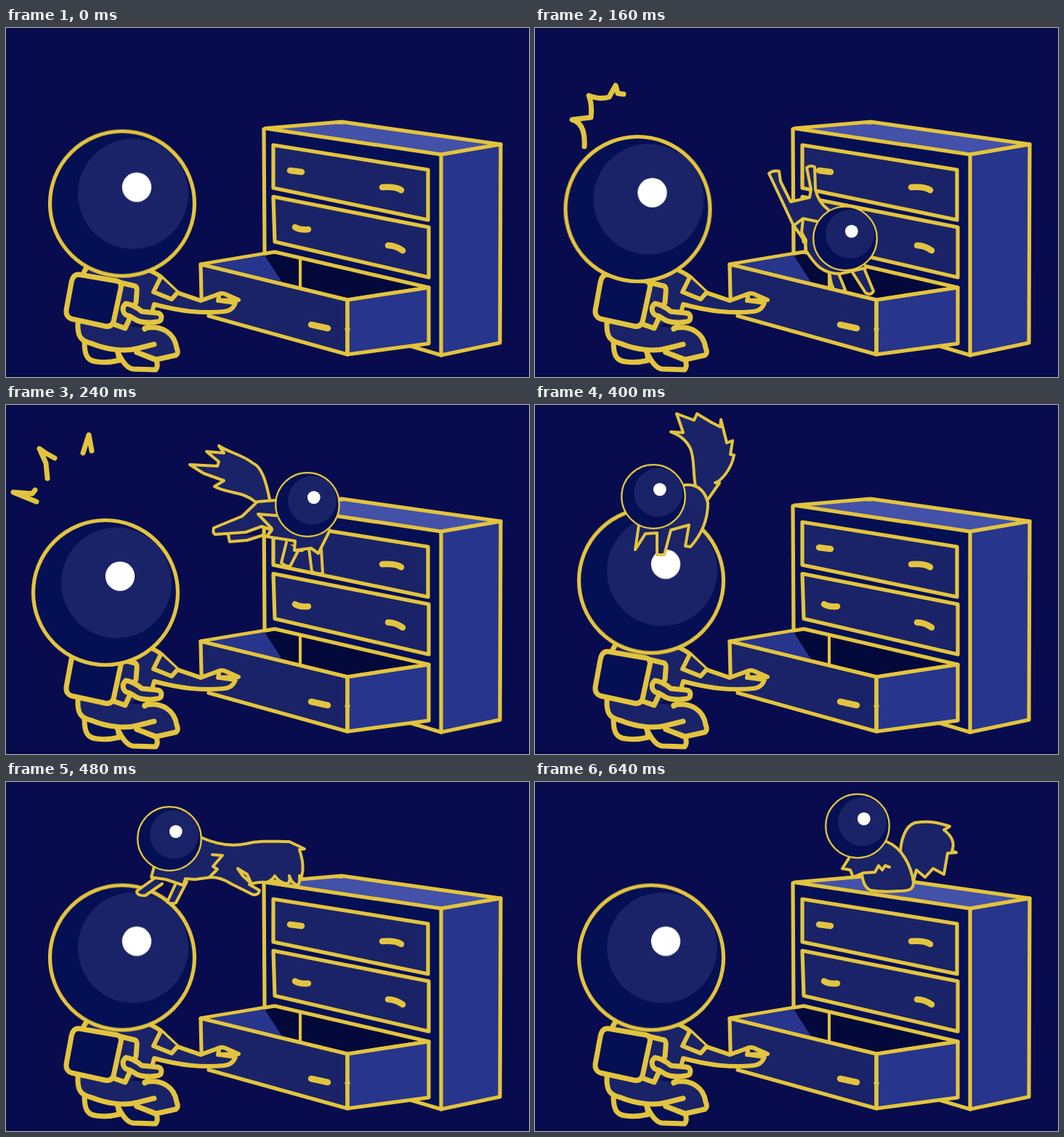
Write an HTML page that moves like this. It is 720 by 480 pixels and loops after 720 ms.

```html
<!DOCTYPE html>
<html lang="en">
<head>
<meta charset="utf-8">
<title>Drawer surprise</title>
<style>
html, body { margin: 0; width: 100%; height: 100%; overflow: hidden; background: #080c4e; }
svg { display: block; width: 100vw; height: 100vh; }
.ink { stroke: #e3c43f; stroke-width: 5.2; stroke-linecap: round; stroke-linejoin: round; fill: none; }
.pet { stroke-width: 4; }
.pull { stroke-width: 8.5; }
.thick { stroke-width: 7; }
.flat { stroke: none; }
.mid { fill: #1a2367; }
.deep { fill: #051054; }
.side { fill: #27358c; }
.top { fill: #4351a8; }
.hole { fill: #02083a; }
.cel { animation: cel 720ms step-end infinite; animation-delay: calc(var(--i) * 80ms - 720ms); }
@keyframes cel {
  0% { visibility: visible; }
  11.1111%, 100% { visibility: hidden; }
}
.helmet { animation: recoil 720ms step-end infinite; }
@keyframes recoil {
  0% { transform: translate(160px, 241.5px); }
  11.1111% { transform: translate(151px, 245px); }
  22.2222% { transform: translate(141.5px, 249px); }
  33.3333% { transform: translate(137px, 258px); }
  44.4444% { transform: translate(148px, 250px); }
  55.5555%, 100% { transform: translate(160px, 241.5px); }
}
</style>
</head>
<body>
<svg viewBox="0 0 720 480">
  <defs>
    <g id="globe">
      <circle class="ink deep" r="99.5"/>
      <circle class="flat mid" cx="15" cy="-13.5" r="76"/>
      <circle class="flat" cx="20" cy="-22.5" r="20.2" fill="#fff"/>
    </g>
    <g id="small"><use href="#globe" transform="scale(.44)"/></g>

    <g id="burst" class="ink pet mid">
      <path d="M406 340Q407 352 412 361Q420 365 427 360L418 338M437 336L455 364Q462 369 466 362L452 328"/>
      <path d="M404 250Q390 240 386 222L385 191Q379 188 374 192L380 222L378 233L352 239L338 211L336 197Q328 195 322 200L341 240L355 270L367 287Q374 298 373 306C385 325 395 338 420 338L455 330"/>
      <path d="M357 271L369 262L388 266M369 263L367 281L373 292L372 304" fill="none"/>
      <use href="#small" x="427" y="289.5"/>
    </g>

    <g id="leap" class="ink pet mid">
      <path d="M275 98L250 116Q250 123 262 122L285 106M303 107L292 131Q298 135 304 132L319 103"/>
      <path d="M338 42C360 52 380 55 400 51C420 46 440 48 460 48L481 58L474 59C479 75 480 85 477 96L474 95Q475 104 472 108Q463 106 460 95Q462 103 457 106Q446 104 440 95Q436 102 428 104Q418 103 405 107L419 115Q418 122 410 121L380 106Q366 97 352 97L330 100L317 99L314 108L290 100L270 97L274 82"/>
      <path d="M354 66L368 67L355 82L361 86L350 97M389 85L402 93L408 106L396 95Z" fill="none"/>
      <use href="#small" x="295" y="44"/>
    </g>
  </defs>

  <rect width="720" height="480" fill="#080c4e"/>
  <path d="M0 .5H720M0 478.5H720" stroke="#050838"/>

  <!-- chest -->
  <g class="ink">
    <path class="flat deep" d="M356 139L599 174V450L356 380Z"/>
    <path class="top" d="M357 138L462 129L681 160L599 174Z"/>
    <path class="side" d="M599 174L681 160L680 433L599 450Z"/>
    <path d="M355 139L356 309M552 436L599 450M457 130H463"/>
    <path class="mid" d="M368 161L581 195V264L368 220ZM368 232L582 274V343L370 294Z"/>
    <path class="pull" d="M391 196L407 198M518 219Q537 218 544 223M398 274Q404 278 416 277M526 299Q536 299 546 306"/>
    <path class="hole" d="M268 325L370 308L582 357L470 374Z"/>
    <path class="flat side" d="M271 325L355 311L381 351Z"/>
    <path d="M268 325L370 308L582 357M405 318V357" stroke-width="4"/>
  </g>

  <g class="cel" style="--i:1"><use href="#burst" x="-6" y="50"/></g>
  <g class="cel" style="--i:2"><use href="#burst"/></g>

  <!-- open drawer -->
  <g class="ink">
    <path class="flat mid" d="M268 325L470 374V449L270 393Z"/>
    <path class="side" d="M470 374L582 357V434L470 449Z"/>
    <path d="M269 370L268 325L470 374V449L279 396M469 414H471"/>
    <path class="pull" d="M420 408L443 413"/>
  </g>

  <!-- crouching figure -->
  <g class="ink thick">
    <path class="deep" d="M108 432C108 450 112 458 125 459Q140 461 156 457L153 440"/>
    <path class="deep" d="M153 444C158 455 165 468 175 469L206 470Q210 465 207 457L180 446"/>
    <path class="flat mid" d="M99 404L190 412C215 408 232 420 235 440Q238 447 234 450L207 456L180 444L118 434C103 430 98 425 99 404Z"/>
    <path d="M99 405C98 425 103 430 118 434C140 443 165 445 180 441L204 435M191 413C215 408 232 420 235 440Q238 447 234 450L207 456L180 446"/>
    <path class="flat mid" d="M110 331L199 334L217 346L236 364L204 390L165 414L147 405Z"/>
    <path class="flat mid" d="M217 346L236 364L268 375L290 367L318 376Q312 390 300 391C270 393 240 390 204 380Z"/>
    <path d="M110 331L105 340"/>
    <path d="M199 334Q212 340 217 346L236 364L268 375L290 367Q298 363 304 367L320 374L292 375L293 370M294 375L316 378Q312 389 300 390C270 393 240 390 204 380L201 391" stroke-width="6"/>
    <path class="mid" d="M213 343L203 363L228 373L236 364" stroke-width="6"/>
    <path class="mid" d="M157 350L178 355Q181 357 180 364L179 377L170 400L164 413L147 407"/>
    <path class="deep" d="M100 339L153 348Q160 350 158 358L148 404Q145 412 136 410L90 400Q82 397 83 388L90 350Q92 339 100 339Z"/>
    <path class="mid" d="M165 379C158 385 161 395 170 396L180 402C190 407 212 405 213 402Q216 393 208 392L187 390Q175 380 165 379Z"/>
    <path d="M191 414L196 410"/>
  </g>
  <g class="helmet"><use href="#globe"/></g>

  <!-- surprise marks -->
  <path class="ink thick cel" style="--i:2" stroke-linecap="butt" d="M68 163C69 145 66 130 51 126L77 123Q79 105 74 93Q90 99 102 95L111 79L114 90L122 91"/>
  <path class="ink thick cel" style="--i:3" d="M40 117L36 122L10 120L42 133M57 101L55 80L46 60L56 67L67 73M106 66L114 41L118 63"/>

  <g class="ink pet mid cel" style="--i:3">
    <path d="M363 130C358 105 352 85 340 80C325 68 308 66 293 56L300 66L276 64L293 78L291 84L253 82L272 94L300 104L287 112C305 122 325 118 343 133"/>
    <path d="M354 179L332 186L308 188L306 179M386 189L379 217Q385 222 391 222L403 199M417 197L421 229Q430 234 436 231L434 198"/>
    <path d="M371 131L346 133L325 153L286 169Q284 176 288 178L330 175L352 167L366 172L359 181L398 187L397 200L420 197L430 204L446 172"/>
    <path d="M372 152L347 150L366 170L359 181" fill="none"/>
    <use href="#small" x="415" y="137"/>
  </g>

  <g class="cel" style="--i:4"><use href="#leap" x="-10" y="48"/></g>

  <g class="ink pet mid cel" style="--i:5">
    <path d="M221 112C217 90 220 75 214 60C208 48 200 42 187 37L204 38L195 12L219 21L223 12L243 24L255 30L256 20L264 52L272 49L269 68L274 69C270 90 255 105 248 107L254 107L238 130"/>
    <path d="M206 110C225 108 235 120 238 135C238 155 232 175 214 195L207 194L212 165L187 172L178 206H168V176L152 177L138 199L143 165"/>
    <use href="#small" x="163" y="126"/>
  </g>

  <g class="cel" style="--i:6"><use href="#leap" x="-70" y="34"/></g>
  <g class="cel" style="--i:7"><use href="#leap"/></g>

  <g class="ink pet mid cel" style="--i:8">
    <path d="M503 100C503 80 510 60 523 56C545 53 555 56 571 61L563 66C575 75 578 85 574 95L580 97L568 98L563 127L548 119L537 131L525 121L521 137"/>
    <path d="M432 105L423 119L434 121L438 131L450 126Q452 145 462 149Q480 152 500 150C515 150 521 148 521 138C518 115 505 90 484 82"/>
    <path d="M438 131L452 125L468 124L473 115L478 121L482 115L488 117" fill="none"/>
    <use href="#small" x="444" y="60.5"/>
  </g>
</svg>
</body>
</html>
```
